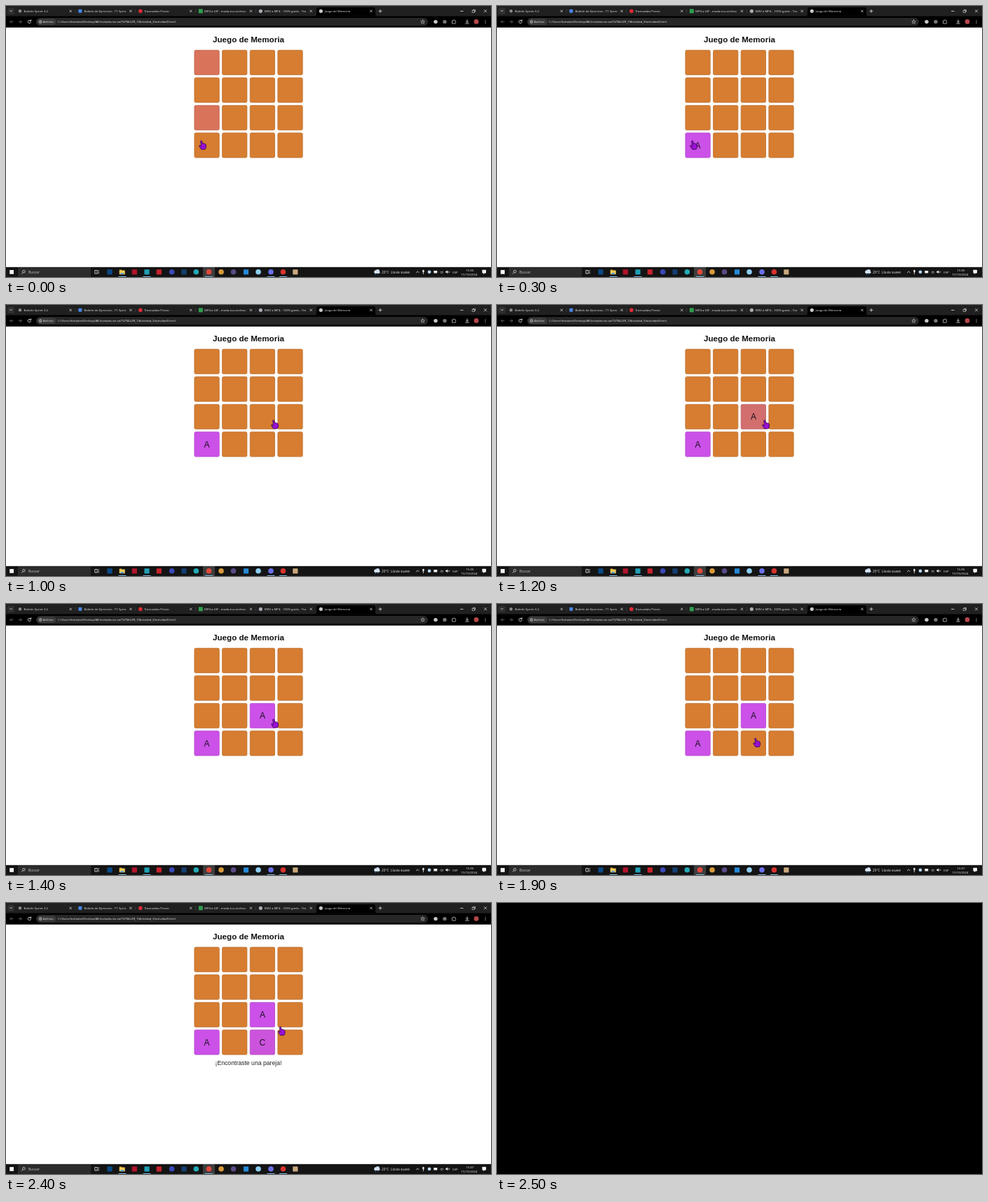
An HTML page that plays this animation: 692 by 388 pixels, repeating every 2600 ms.

```html
<!DOCTYPE html>
<html lang="es">
<head>
<meta charset="utf-8">
<title>Juego de Memoria</title>
<style>
  html, body { margin: 0; width: 100%; height: 100%; overflow: hidden; background: #000; }
  svg { display: block; width: 692px; height: 388px; }
  text { white-space: pre; }
  .ui { font-family: "Open Sans", "Noto Sans", sans-serif; }
  .page { font-family: "Liberation Sans", Arial, sans-serif; text-anchor: middle; }
</style>
</head>
<body>
<svg id="stage" viewBox="0 0 692 388" xmlns="http://www.w3.org/2000/svg"></svg>
<script>
const LOOP = 2600, STEP = 100;
const ORANGE = [214, 125, 49], PURPLE = [203, 81, 232], RED = [217, 115, 90];
const stage = document.getElementById('stage');

const rect = (x, y, w, h, fill, r = 0, extra = '') =>
  `<rect x="${x}" y="${y}" width="${w}" height="${h}" rx="${r}" fill="${fill}" ${extra}/>`;
const dot = (x, y, r, fill) => `<circle cx="${x}" cy="${y}" r="${r}" fill="${fill}"/>`;
const line = (d, color = '#e8e8e8', w = 0.8) =>
  `<path d="${d}" fill="none" stroke="${color}" stroke-width="${w}" stroke-linecap="round" stroke-linejoin="round"/>`;
const label = (x, y, size, str, fill = '#e6e6e6', extra = '') =>
  `<text class="ui" x="${x}" y="${y}" font-size="${size}" fill="${fill}" ${extra}>${str}</text>`;
const cross = (x, y, r, w = 0.7) =>
  line(`M${x - r} ${y - r}l${2 * r} ${2 * r}m0 ${-2 * r}l${-2 * r} ${2 * r}`, '#e8e8e8', w);

function tabs() {
  const list = [
    ['Boletín Sprint 3.2', dot(20, 7.3, 2.2, '#8c8c8c')],
    ['Boletín de Ejercicios - T1 Sprin', rect(103.3, 4.7, 5, 5, '#4a86e8', 0.6)],
    ['Tramudato Precio', dot(191.8, 7.3, 2.8, '#e02b36')],
    ['MP4 a GIF - muda-tus-archivo', rect(274.8, 4.3, 6, 6, '#2f9e4f')],
    ['MKV a MP4 - 100% gratis - Tra', dot(363.3, 7.3, 2.6, '#a9adb3')],
    ['Juego de Memoria', dot(449.3, 7.3, 2.6, '#c4c7cc')]
  ];
  let s = rect(0, 0, 692, 16, '#202020') + rect(2, 2.5, 10, 9.5, '#303030', 2.5) +
    line('M5.7 6.4l1.4 1.5l1.4-1.5');
  s += '<path d="M440 14.5Q443 14.5 443 11.5V5Q443 2 446 2H524Q527 2 527 5V11.5Q527 14.5 530 14.5Z" fill="#000"/>';
  list.forEach(([name, icon], i) => {
    const x = 25.6 + i * 85.8;
    s += icon + label(x, 9, 4.3, name) + cross(92.2 + i * 85.75, 7.3, 1.4);
    if (i < 4) s += rect(98.8 + i * 85.8, 4.5, 0.5, 5.5, '#555');
  });
  s += line('M532 7.3h4m-2-2v4') + line('M648.5 7.4h3.6') +
    line('M665.5 6.3h3v3h-3zM666.5 6.3v-1h3v3h-1', '#e8e8e8', 0.6) + cross(684, 7.2, 1.7);
  return s;
}

function toolbar() {
  let s = rect(0, 14.5, 692, 16.3, '#000');
  s += line('M10.2 22.6h-4.2m1.8-1.9l-1.9 1.9l1.9 1.9', '#6b6b6b') +
    line('M18 22.6h4.2m-1.8-1.9l1.9 1.9l-1.9 1.9', '#6b6b6b') +
    line('M35.4 21.4a2.2 2.2 0 1 0 .1 2M35.7 19.7v1.9h-1.9');
  s += rect(43, 17, 559, 11.2, '#272727', 5.6) + rect(44.5, 18.2, 27, 8.8, '#3b3b3b', 4.4);
  s += `<circle cx="49.2" cy="22.6" r="1.9" fill="none" stroke="#eee" stroke-width=".6"/>` +
    line('M49.2 22.4v1.1M49.2 21.5v.05', '#eee', 0.6);
  s += label(53, 24.2, 4.2, 'Archivo', '#f0f0f0') +
    label(74.3, 24.2, 4.05, 'C:/Users/Invitados/Desktop/AB-Invitados.tar-ea/T4/TALLER_7/Actividad_3/actividad3.html', '#f0f0f0');
  s += line('M594.6 20l.8 1.7l1.9.2l-1.4 1.3l.4 1.9l-1.7-1l-1.7 1l.4-1.9l-1.4-1.3l1.9-.2z', '#ddd', 0.6);
  s += dot(613, 22.6, 2.7, '#c9c9c9') + dot(626, 22.6, 2.7, '#777');
  s += line('M637 21h1.3a1 1 0 0 1 2 0h1v1.4a1 1 0 0 1 0 1.8v.9h-4.3z', '#ddd', 0.7);
  s += line('M658 19.8v3.6m-1.6-1.5l1.6 1.6l1.6-1.6M655.7 25.1h4.6');
  s += dot(671, 22.4, 3.4, '#b4474a');
  for (const y of [20.7, 22.6, 24.5]) s += dot(684, y, 0.55, '#ddd');
  return s;
}

function cards() {
  let s = '';
  for (let i = 0; i < 16; i++) {
    const x = 268.9 + (i % 4) * 39.65, y = 63.3 + (i >> 2) * 39.5;
    s += rect(x, y, 35.3, 35.3, '#d67d31', 1.8, `id="c${i}" stroke-width=".8"`);
    s += `<text id="t${i}" class="page" x="${x + 17.7}" y="${y + 21.8}" font-size="12" fill="#1c1020"></text>`;
  }
  return s;
}

function taskbar() {
  let s = rect(0, 373.8, 692, 14.2, '#141414') + rect(5.2, 378, 5.8, 5.8, '#f2f2f2');
  s += rect(17, 374.3, 104, 13.4, '#2c2c2c') +
    '<circle cx="25.4" cy="380.2" r="1.8" fill="none" stroke="#eee" stroke-width=".7"/>' +
    line('M24 381.7l-1.6 1.7', '#eee', 0.7) + label(32, 382.8, 5, 'Buscar', '#c8c8c8');
  s += line('M127.2 378.5h3v4.6h-3zM132.2 378.5v1M132.2 381v2.1', '#eee', 0.8);
  s += rect(281, 374, 17, 14, '#3d3d3d');

  const icons = [
    [148, '#0b4a86', 1], [183.3, '#b3132b', 1], [201, '#1f9fb5', 1], [218.3, '#c8222c', 1],
    [236.6, '#3a49b8'], [254, '#143f73', 1], [271.3, '#22a9b5'], [289.5, '#e0483c'],
    [307, '#d99a3c'], [324.5, '#5a4a86'], [342.5, '#2489d8', 1], [360, '#8ccdf0'],
    [378, '#6a70e8'], [395.4, '#d8322e'], [412.8, '#c9a77c', 1]
  ];
  for (const [x, c, square] of icons)
    s += square ? rect(x - 3.6, 377.2, 7.2, 7.2, c, 0.6) : dot(x, 380.8, 3.8, c);
  s += rect(161.7, 377.6, 3.6, 2, '#d89b20', 0.4) + rect(161.7, 378.4, 8, 5.8, '#f5cb58', 0.4) +
    rect(163.4, 382.2, 4.6, 2, '#4d9fdc');
  for (const x of [166, 201, 289.5, 378, 395.4]) s += rect(x - 5.5, 387, 11, 1, '#7fb4dc');

  s += dot(527.5, 380.5, 2.2, '#dbe6f2') + dot(530.3, 379.7, 2.7, '#c8d9ee') +
    rect(525.4, 380, 8.2, 2.7, '#dbe6f2', 1.3) + line('M527.5 383.8l-.5 1M530.8 383.8l-.5 1', '#4aa3ea');
  s += label(536, 382.6, 4.75, '20°C  Lluvia suave', '#f0f0f0');
  s += line('M585.4 381.8l1.9-1.9l1.9 1.9');
  s += rect(594.3, 377.7, 2.3, 4, '#eee', 1.1) + line('M595.4 382v1.8', '#eee');
  s += dot(604, 380.8, 2.4, '#b8d4ee') + rect(610.3, 379, 5, 3.4, '#eee', 0.4);
  s += line('M619.5 381.2a3 3 0 0 1 4.6 0M620.7 382.4a1.6 1.6 0 0 1 2.2 0', '#eee', 0.6);
  s += '<path d="M627.3 379.8h1.4l1.6-1.4v4.8l-1.6-1.4h-1.4z" fill="#eee"/>' + cross(632.2, 380.8, 0.9, 0.5);
  s += label(637.3, 382.5, 4.3, 'ESP', '#f0f0f0');
  s += label(662, 379.7, 4.3, '16:06', '#f0f0f0', 'id="clock" text-anchor="middle"') +
    label(661, 386.2, 4.3, '15/10/2024', '#f0f0f0', 'text-anchor="middle"');
  s += rect(679.4, 377.8, 5.6, 4.7, '#f2f2f2', 0.4) + '<path d="M681 382h2.4l-2.4 2z" fill="#f2f2f2"/>';
  return s;
}

const hand = `<path id="hand" fill="#9a0fd6" stroke="#2c0840" stroke-width=".8" stroke-linejoin="round"
  d="M-1 .8Q-.2-.5.8.6L1.9 4.4L3 3.9L4.3 4.6L5.4 4.7L6.6 5.8L6.8 9.4L5.6 12.4L.2 12.7L-1.7 10.2L-3.1 7.3Q-2.7 6.2-1.6 7L-.2 8Z"/>`;

stage.innerHTML = rect(0, 0, 692, 388, '#fff') + tabs() + toolbar() +
  '<text class="page" x="346" y="52" font-size="11.6" font-weight="700" fill="#111">Juego de Memoria</text>' +
  cards() +
  '<text id="note" class="page" x="346" y="232.4" font-size="8.68" fill="#222">¡Encontraste una pareja!</text>' +
  taskbar() + hand + rect(0, 0, 692, 388, '#000', 0, 'id="night"');

const el = id => document.getElementById(id);
const clamp = v => Math.max(0, Math.min(1, v));
const mix = (a, b, p) => a.map((v, i) => v + (b[i] - v) * p);
const rgb = c => `rgb(${c.map(Math.round).join(',')})`;
const show = (node, on) => node.setAttribute('visibility', on ? 'visible' : 'hidden');

function paint(i, color, letter = '') {
  el('c' + i).setAttribute('fill', rgb(color));
  el('c' + i).setAttribute('stroke', rgb(color.map(v => v * 0.87)));
  el('t' + i).textContent = letter;
}

// card, letter, start of its colour fade
const flips = [[12, 'A', 0], [10, 'A', 1100], [14, 'C', 2120]];

// time, x, y of the fingertip
const path = [
  [600, 278.7, 192.7], [700, 297, 187], [800, 337, 174], [900, 371, 166], [1000, 381.7, 164.6],
  [1600, 381.7, 164.6], [1700, 379, 174], [1800, 372, 187], [1900, 368.8, 192],
  [2200, 368.8, 192], [2300, 382, 184], [2400, 391.3, 176.8]
];

function tip(t) {
  const n = path.findIndex(k => k[0] >= t);
  if (n === 0) return path[0].slice(1);
  if (n < 0) return path[path.length - 1].slice(1);
  const a = path[n - 1], b = path[n];
  return mix(a, b, (t - a[0]) / (b[0] - a[0])).slice(1);
}

function draw(t) {
  for (let i = 0; i < 16; i++) paint(i, ORANGE);
  for (const i of [0, 8]) paint(i, mix(RED, ORANGE, clamp(t / 200)));
  for (const [i, letter, start] of flips) {
    const p = clamp((t - start) / 300);
    if (p > 0) paint(i, mix(ORANGE, PURPLE, p), letter);
  }
  el('hand').setAttribute('transform', `translate(${tip(t).join(' ')})`);
  el('clock').textContent = t < 1800 ? '16:06' : '16:07';
  show(el('note'), t >= 2300);
  show(el('night'), t >= 2500);
}

const begin = performance.now();
function tick() {
  const t = (performance.now() - begin) % LOOP;
  draw(Math.floor(t / STEP) * STEP);
  requestAnimationFrame(tick);
}
tick();
</script>
</body>
</html>
```
